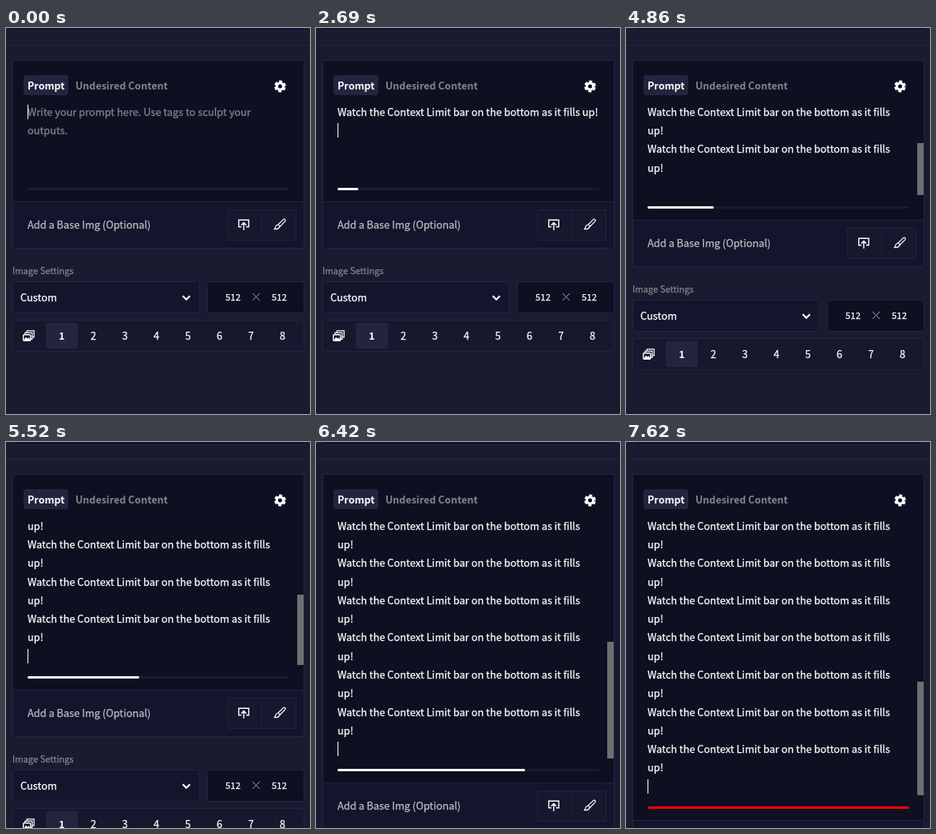
An HTML page that plays this animation: 381x483 px, repeating every 8000 ms.

```html
<!DOCTYPE html>
<html lang="en">
<head>
<meta charset="utf-8">
<title>Context limit bar</title>
<style>
html, body { margin: 0; width: 100%; height: 100%; overflow: hidden; background: #191b31; }
svg { display: block; width: 381px; height: 483px; }
text { font: 12.81px "Noto Sans CJK JP", "Noto Sans CJK SC", "Noto Sans CJK KR", "Noto Sans", sans-serif; fill: #fff; stroke: #fff; stroke-width: .25; white-space: pre; }
.bold { font-weight: 700; font-size: 12.5px; stroke-width: 0; }
.small { font-size: 11.3px; }
.dim { fill: #84858f; stroke: #84858f; }
.mid { text-anchor: middle; }
.edge { stroke: #22253f; }
.deep { fill: #0e0f21; }
.base { fill: #13152c; }
.soft { fill: #16182e; }
.lit { fill: #22253f; }
.icon { fill: none; stroke: #fff; stroke-width: 1.4; }
.thin { stroke-width: 1.2; }
</style>
</head>
<body>
<svg viewBox="0 0 381 483">
  <rect class="base edge" x="8.5" y="-9.5" width="365" height="13"/>
  <path class="edge" d="M0 21.5H381"/>

  <rect id="panel" class="deep edge" x="8.5" y="40.5" width="365"/>
  <rect class="lit" x="22" y="59" width="56" height="25" rx="3"/>
  <text class="bold" x="27" y="77">Prompt</text>
  <text class="bold dim" x="87" y="77">Undesired Content</text>
  <g fill="none" stroke="#fff" transform="translate(343.5 73)">
    <circle r="4.1" stroke-width="3.2"/>
    <circle r="6" stroke-width="2.8" stroke-dasharray="3.8 2.483" transform="rotate(12)"/>
  </g>
  <g id="lines"></g>
  <rect id="caret" x="27" width="1" height="18" fill="#fff"/>
  <rect id="thumb" x="365" width="8" fill="#6f6f72"/>

  <g id="lower">
    <rect fill="#191b31" x="27" y="200" width="328" height="3" rx="1.5"/>
    <rect id="bar" x="27" y="200" height="3" rx="1.5"/>
    <rect class="base edge" x="8.5" y="217.5" width="365" height="58"/>
    <text x="27" y="251" opacity=".72">Add a Base Img (Optional)</text>
    <rect class="soft edge" x="277.5" y="227.5" width="86" height="38" rx="2"/>
    <path class="edge" d="M320.5 231V262"/>
    <path class="icon" d="M295 248.8h-3.3v-8.6h12.6v8.6H301M298 253v-9.5M294.8 246.7l3.2-3.2 3.2 3.2"/>
    <path class="icon thin" d="M341 246l6.6-6.4q1.3-.9 2.2 0t0 2.2l-6.4 6.6zM341 246q-2.4.4-3 2.4-.4 2-1.6 3.2 5 .6 7-3.2"/>

    <text class="dim" x="8" y="308" style="font-size:11.15px">Image Settings</text>
    <rect class="base edge" x="8.5" y="317.5" width="234" height="39" rx="2"/>
    <text x="18" y="342">Custom</text>
    <path class="icon" style="stroke-width:2.2" d="M221.5 335.3l4.5 4.5 4.5-4.5"/>
    <rect class="deep edge" x="252.5" y="317.5" width="121" height="39" rx="2"/>
    <text class="small mid" x="284.5" y="341">512</text>
    <path class="icon" style="stroke:#a2a3ac;stroke-width:1" d="M309 332l9 9m0-9l-9 9"/>
    <text class="small mid" x="342.5" y="341">512</text>

    <rect class="soft edge" x="8.5" y="365.5" width="365" height="39" rx="2"/>
    <rect class="lit" x="50" y="369" width="40" height="32" rx="2"/>
    <g id="counts"></g>
    <rect class="icon" x="21.7" y="383.7" width="9" height="7.6" rx="1"/>
    <path fill="#fff" d="M22 391l3-4.2 2 2 1.5-1.6 2.2 3.8z"/>
    <path class="icon thin" d="M23.8 383.5v-2.2h9v8h-2M26.2 381v-2.2h9v8h-2"/>
  </g>
</svg>
<script>
const LOOP = 8000, ROW = 23.28, START = "Watch the Context Limit bar on the bottom as it fills";
const HINT = ["Write your prompt here. Use tags to sculpt your", "outputs."];

// Each paste takes two steps: the text lands first, then the bar and the box size follow.
const steps = [1810, 1890, 3020, 3090, 4000, 4050, 4510, 4580, 4910, 4980, 5200, 5270, 5440, 5480,
  5520, 5670, 5740, 5830, 5900, 5990, 6100, 6200, 6260, 6330, 6420];
for (let i = 0; i <= 10; i++) steps.push(6520 + 57 * i);
const caretOff = [[530, 1080], [1630, 1810], [2160, 2690], [3260, 3780], [4330, 4510], [4860, 4910], [7140, 7620]];

const el = id => document.getElementById(id);
const set = (id, attrs) => { for (const k in attrs) el(id).setAttribute(k, attrs[k]); };
const rowY = (y, i) => Math.round(y + ROW * i);

el("counts").innerHTML = [1, 2, 3, 4, 5, 6, 7, 8].map((n, i) =>
  `<text class="mid${i ? "" : " bold"}" x="${70 + 39.5 * i}" y="390">${n}</text>`).join("");

function textLines(pasted) {
  if (!pasted) return HINT;
  const lines = [];
  for (let i = 0; i < pasted; i++) {
    if (pasted < 4) lines.push(START + " up!");
    else lines.push(START, "up!");
  }
  return [...lines, ""];
}

let shown = -1;
function layout(done) {
  if (done === shown) return;
  shown = done;
  const pasted = Math.ceil(done / 2), counted = done >> 1;
  const rows = Math.min(15, Math.max(4, counted + 1));
  const all = textLines(pasted), view = all.slice(-rows);
  const grow = rowY(-0.1, rows - 4), track = ROW * rows;

  el("lines").innerHTML = view.map((s, i) =>
    `<text x="27" y="${rowY(109.8, i)}"${pasted ? "" : ' class="dim"'}>${s}</text>`).join("");
  set("caret", { y: rowY(95.9, pasted ? view.length - 1 : 0) });

  const size = pasted < 4 ? 0 : Math.round(track * rows / all.length);
  set("thumb", { y: Math.round(93 + track) - size, height: size });
  set("panel", { height: 177 + grow });
  set("lower", { transform: `translate(0 ${grow})` });

  const width = counted ? Math.min(328, 7 + 19 * counted) : 0;
  set("bar", { width, fill: width < 328 ? "#fff" : "#f00" });
}

function frame(now) {
  const t = now % LOOP;
  layout(steps.filter(s => s <= t).length);
  set("caret", { opacity: caretOff.some(([a, b]) => t >= a && t < b) ? 0 : 1 });
  requestAnimationFrame(frame);
}
frame(0);
</script>
</body>
</html>
```
